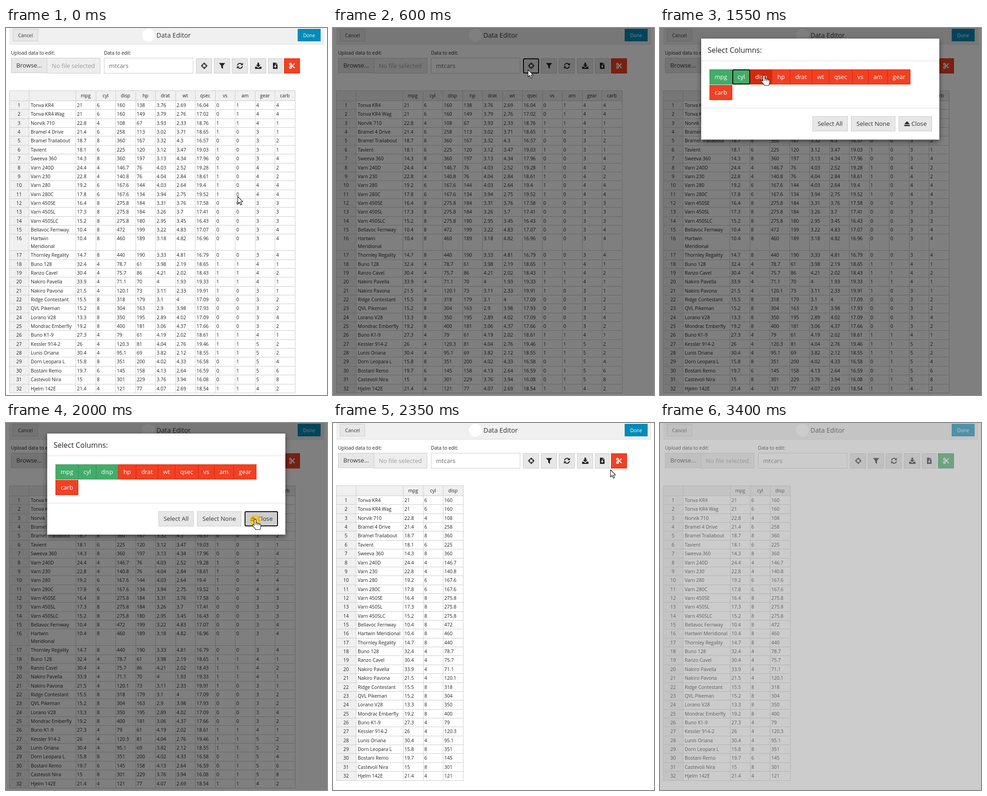
An HTML page that plays this animation: 701x799 px, repeating every 3.45 s.

```html
<!DOCTYPE html>
<html lang="en">
<head>
<meta charset="utf-8">
<title>Data Editor</title>
<style>
html, body { margin: 0; width: 100%; height: 100%; overflow: hidden; background: #fff; }
svg { display: block; font-family: "Open Sans", sans-serif; font-size: 10.4px; fill: #222; }
text { white-space: pre; }
rect { shape-rendering: crispEdges; }
.ring { shape-rendering: auto; fill: none; stroke: #111; stroke-width: 2; }
.mid { text-anchor: middle; }
.big { font-size: 13.2px; }
</style>
</head>
<body>
<svg id="stage" width="701" height="799" viewBox="0 0 701 799">
  <defs>
    <filter id="shadow" x="-10%" y="-10%" width="120%" height="130%">
      <feDropShadow dx="0" dy="4" stdDeviation="6" flood-color="#000" flood-opacity=".5"/>
    </filter>
  </defs>
  <g id="page"></g>
  <rect id="backdrop" width="701" height="799" fill="#000"/>
  <g id="modal"></g>
  <rect id="ended" width="701" height="799" fill="#999" opacity=".5"/>
  <circle id="press" r="12" fill="#ffc40c" opacity=".72"/>
  <g id="cursor" stroke="#111" stroke-width="1.1" fill="#fff" stroke-linejoin="round">
    <path id="arrow" d="M0 0V15.5L3.6 12.2L6.2 18.2L8.8 17L6.3 11.2H11.2Z"/>
    <g id="hand">
      <path d="M-2 .5C-2 -2 2 -2 2 .5V7C3 5.8 5.5 6 5.8 7.8C7 6.8 9 7.2 9.3 8.8C10.6 8.2 12.5 8.8 12.5 10.8V15C12.5 17 11 18.5 11 21H1C0 18 -6 13.5 -6 11.5C-6 9.5 -3.5 9.8 -2 12Z"/>
      <path d="M2 7V11M5.8 8V11.5M9.3 9V12" fill="none"/>
    </g>
  </g>
</svg>
<script>
const LOOP = 3450, STEP = 50;
const $ = id => document.getElementById(id);

function add(parent, tag, attrs, text) {
  const el = document.createElementNS('http://www.w3.org/2000/svg', tag);
  for (const k in attrs) el.setAttribute(k, attrs[k]);
  if (text !== undefined) el.textContent = text;
  return parent.appendChild(el);
}
const box = (p, x, y, w, h, fill) => add(p, 'rect', { x, y, width: w, height: h, fill });
const label = (p, x, y, s, attrs) => add(p, 'text', { x, y, ...attrs }, s);
const framed = (p, x, y, w, h, fill, edge) => {
  box(p, x, y, w, h, edge);
  box(p, x + 1, y + 1, w - 2, h - 2, fill);
};
const show = (el, on) => el.setAttribute('display', on ? 'inline' : 'none');

// fill, hover fill, edge, ink
const LOOK = {
  grey: ['#e7e7e7', '#cecece', '#cbcbcb', '#333'],
  red: ['#f04124', '#d32a0e', '#ea2f10', '#fff'],
  green: ['#43ac6a', '#358753', '#3c9a5f', '#fff'],
  blue: ['#008cba', '#006687', '#0079a1', '#fff']
};

function button(parent, x, y, w, h, look, s, cls = 'mid big', tx = x + w / 2) {
  const g = add(parent, 'g', {});
  const edge = box(g, x, y, w, h, '');
  const face = box(g, x + 1, y + 1, w - 2, h - 2, '');
  if (s) label(g, tx, y + h / 2 + (cls === 'mid' ? 4.2 : 4.9), s, { class: cls, fill: LOOK[look][3] });
  const ring = add(parent, 'rect', { class: 'ring', x: x + 1, y: y + 1, width: w - 2, height: h - 2, rx: 2.5 });
  const b = {
    g,
    has: (px, py) => px >= x && px < x + w && py >= y && py < y + h,
    paint(kind, hover, focus) {
      face.setAttribute('fill', LOOK[kind][hover ? 1 : 0]);
      edge.setAttribute('fill', LOOK[kind][2]);
      show(ring, focus);
    }
  };
  b.paint(look, false, false);
  return b;
}

const ICON = {
  target: '<circle r="4.7" fill="none" stroke="#222" stroke-width="1.8"/><path d="M0-7V-2.2M0 7V2.2M-7 0H-2.2M7 0H2.2" stroke="#222" stroke-width="1.8"/>',
  filter: '<path d="M-6.8-6H6.8L1.9-.2V6.8L-1.9 3.8V-.2Z"/>',
  refresh: '<path d="M-5.4-.8A5.4 5.4 0 0 1 4-3.6M5.4.8A5.4 5.4 0 0 1-4 3.6" fill="none" stroke="#222" stroke-width="2"/><path d="M6.5-6.5V-1.2H1.2ZM-6.5 6.5V1.2H-1.2Z"/>',
  download: '<path d="M-1.8-6.8H1.8V-2H5L0 3L-5-2H-1.8ZM-7 2H-3.4L0 5L3.4 2H7V6.6H-7Z"/>',
  file: '<path d="M-5-6.8H1.2V-2.9H5V6.8H-5ZM2-6.8L5-3.7H2Z"/><path d="M-1-2H1V1H3.2L0 4.4L-3.2 1H-1Z" fill="#e7e7e7"/>',
  cut: '<g fill="none" stroke="#fff" stroke-width="1.8"><circle cx="-3.6" cy="-3.6" r="2"/><circle cx="-3.6" cy="3.6" r="2"/><path d="M-2.2-2.2L5.6 5M-2.2 2.2L5.6-5" stroke-width="2.2"/></g>',
  eject: '<path d="M0-5.5L6 1H-6ZM-6 2.6H6V5H-6Z"/>'
};
const icon = (p, name, x, y) =>
  add(p, 'g', { transform: `translate(${x} ${y})` }).innerHTML = ICON[name];

// name, mpg, disp; the remaining columns follow from these
const cars = `Tonva KR4,21,160|Tonva KR4 Wag,21,160|Norvik 710,22.8,108|Bramel 4 Drive,21.4,258
|Bramel Trailabout,18.7,360|Tavient,18.1,225|Sweeva 360,14.3,360|Varn 240D,24.4,146.7
|Varn 230,22.8,140.8|Varn 280,19.2,167.6|Varn 280C,17.8,167.6|Varn 450SE,16.4,275.8
|Varn 450SL,17.3,275.8|Varn 450SLC,15.2,275.8|Bellavoc Fernway,10.4,472|Hartwin Meridional,10.4,460
|Thornley Regality,14.7,440|Buno 128,32.4,78.7|Ranzo Cavel,30.4,75.7|Nakiro Pavella,33.9,71.1
|Nakiro Pavona,21.5,120.1|Ridge Contestant,15.5,318|QVL Pikeman,15.2,304|Lorano V28,13.3,350
|Mondrac Emberfly,19.2,400|Buno K1-9,27.3,79|Kessler 914-2,26,120.3|Lunis Oriana,30.4,95.1
|Dorn Leopara L,15.8,351|Bostani Remo,19.7,145|Castevoli Nira,15,301|Hjelm 142E,21.4,121`
  .replace(/\n/g, '').split('|').map(specs);

function specs(line, i) {
  const [name, mpg, disp] = line.split(',');
  const within = (a, b) => i >= a && i <= b;
  const noise = (seed, size) => {
    const v = Math.sin(i * 12.9898 + seed * 78.233) * 43758.5453;
    return (v - Math.floor(v) - .5) * size;
  };
  const fix = (v, places) => +v.toFixed(places);
  const cyl = disp > 270 ? 8 : disp > 150 || mpg < 21 ? 6 : 4;
  const am = +(i < 3 || within(17, 19) || i > 24);
  const vs = +(cyl === 4 || (cyl === 6 && !am));
  const gear = within(26, 30) ? 5 : am || within(7, 10) ? 4 : 3;
  const carb = +'44112142244333444121122421224682'[i];
  return {
    name,
    cells: {
      mpg, cyl, disp,
      hp: fix(24 * cyl + 10 * carb - 40 + noise(1, 20), 0),
      drat: fix((gear === 3 ? 3.1 : 4) + noise(2, .5), 2),
      wt: fix(1.65 + .0072 * disp + noise(3, .5), 2),
      qsec: fix(17.2 + 2.2 * vs - .7 * am + noise(4, 1.6), 2),
      vs, am, gear, carb
    }
  };
}
const colNames = Object.keys(cars[0].cells);

function table(count, left, wrap) {
  const g = add($('page'), 'g', {});
  const px = Math.round, colX = c => left + 43.5 * c, top = 137;
  const rowY = i => 159 + 19.36 * i + (wrap && i > 15 ? 16.4 : 0);
  const right = px(colX(count)), bottom = px(rowY(32)), edge = '#ccc';
  box(g, 7, top, right - 7, 22, '#f0f0f0');
  box(g, 7, top, 43, bottom - top, '#f0f0f0');
  for (let c = -2; c <= count; c++)
    box(g, c < 0 ? 7 + 43 * (c + 2) : px(colX(c)), top - 1, 1, bottom - top + 1, edge);
  box(g, 7, top - 1, right - 6, 1, edge);
  for (let r = 0; r <= 32; r++) box(g, 7, px(rowY(r)) - 1, right - 6, 1, edge);
  const shown = colNames.slice(0, count);
  shown.forEach((name, c) => label(g, colX(c) + 22, 151, name, { class: 'mid' }));
  cars.forEach(({ name, cells }, r) => {
    const y = rowY(r) + 13;
    label(g, 28.5, y, r + 1, { class: 'mid' });
    (wrap && r === 15 ? name.split(' ') : [name]).forEach((s, i) => label(g, 54, y + 17 * i, s));
    shown.forEach((col, c) => label(g, colX(c) + 3, y, cells[col]));
  });
  return g;
}

// page
const page = $('page');
box(page, 0, 0, 701, 799, '#fff');
box(page, 7, 0, 688, 36, '#f0f0f0');
box(page, 7, 35, 688, 1, '#ddd');
button(page, 15, 2, 55, 27, 'grey', 'Cancel', 'mid');
const done = button(page, 637, 2, 50, 27, 'blue', 'Done', 'mid');
add(page, 'circle', { cx: 311, cy: 16, r: 14, fill: '#fff' });
label(page, 328.5, 20.5, 'Data Editor', { 'font-size': 14.3, fill: '#333' });
label(page, 11, 58, 'Upload data to edit:');
label(page, 214, 58, 'Data to edit:');
framed(page, 89, 65, 117, 34, '#eee', '#ccc');
label(page, 100, 87, 'No file selected', { class: 'big', fill: '#999' });
button(page, 11, 65, 79, 33, 'grey', 'Browse...');
framed(page, 214, 65, 195, 34, '#fff', '#ccc');
label(page, 225, 87, 'mtcars', { class: 'big', fill: '#666' });
let toolX = 415;
const tools = ['target', 'filter', 'refresh', 'download', 'file', 'cut'].map(name => {
  const w = name === 'file' ? 32 : 35.8, x = Math.round(toolX);
  const b = button(page, x, 66, Math.floor(w), 33, name === 'cut' ? 'red' : 'grey');
  icon(b.g, name, x + w / 2, 82.3);
  toolX += w + 3.4;
  return b;
});
const fullTable = table(11, 152, true), cutTable = table(3, 153, false);

// dialog
const modal = $('modal');
add(modal, 'rect', { x: 90, y: 23, width: 520, height: 220, fill: '#fff', filter: 'url(#shadow)' });
box(modal, 90, 71, 520, 1, '#ddd');
box(modal, 90, 174, 520, 1, '#ddd');
label(modal, 104, 54, 'Select Columns:', { 'font-size': 16 });

function textWidth(s) {
  const el = label(modal, 0, 0, s, { class: 'big' }), w = el.getComputedTextLength();
  el.remove();
  return w;
}
let pickX = 108, pickY = 90;
const picks = colNames.map(name => {
  const w = textWidth(name) + 22.5;
  if (pickX + w > 590) [pickX, pickY] = [108, pickY + 34];
  const x = Math.round(pickX);
  pickX += w;
  return button(modal, x, pickY, Math.round(pickX) - x, 33, 'red', name);
});
button(modal, 333, 192, 77, 33, 'grey', 'Select All');
button(modal, 417, 192, 97, 33, 'grey', 'Select None');
const closer = button(modal, 521, 192, 73, 33, 'grey', 'Close', 'big', 549);
icon(closer.g, 'eject', 539.5, 208.5);

// pointer stops: arrive, leave, x, y
const stops = [[0, 0, 506, 367], [350, 650, 426, 91], [1000, 1150, 142, 101], [1300, 1400, 178, 105],
  [1550, 1700, 227, 104], [1950, 2200, 544, 211], [2350, 2350, 606, 102], [2450, 2650, 624, 82],
  [2850, 3300, 664, 18], [3350, LOOP, 676, 39]];
const presses = [400, 1100, 1350, 1600, 2000, 2500, 2950];
const chosen = [1150, 1400, 1650];

const ramp = (t, from, span) => Math.max(0, Math.min(1, (t - from) / span));
const easeOut = v => 1 - (1 - v) ** 1.8;

function pointerAt(t) {
  const i = stops.findIndex(s => t <= s[1]);
  const [arrive, , x, y] = stops[i];
  if (t >= arrive) return [x, y];
  const [, leave, x0, y0] = stops[i - 1];
  const u = ramp(t, leave, arrive - leave), s = u * u * (3 - 2 * u);
  return [x0 + (x - x0) * s, y0 + (y - y0) * s];
}

function draw(t) {
  const [x, y] = pointerAt(t);
  const dim = ramp(t, 450, 150) - ramp(t, 2200, 150);
  const fade = ramp(t, 620, 150) - ramp(t, 2090, 145);
  const lift = t < 1500 ? 1 - easeOut(ramp(t, 620, 300)) : easeOut(ramp(t, 2085, 250));
  const ended = t >= 3150;
  const onPage = dim === 0 && !ended, onModal = t >= 700 && t < 2100;
  let hot = false;
  const over = (b, live) => {
    const hit = live && b.has(x, y);
    hot = hot || hit;
    return hit;
  };

  done.paint('blue', over(done, onPage), false);
  tools.forEach((b, i) => {
    const cut = i === 5;
    b.paint(cut ? (t >= 2550 ? 'green' : 'red') : 'grey', over(b, onPage),
      (i === 0 && t >= 400 && t < 700) || (cut && t >= 2500 && t < 2950));
  });
  picks.forEach((b, i) => b.paint(t >= chosen[i] ? 'green' : 'red', over(b, onModal),
    t >= chosen[i] && t < (chosen[i + 1] || 2000)));
  closer.paint('grey', over(closer, onModal), t >= 2000);

  show(fullTable, t < 2150);
  show(cutTable, t >= 2150);
  $('backdrop').setAttribute('opacity', .5 * dim);
  modal.setAttribute('opacity', fade);
  modal.setAttribute('transform', `translate(0 ${Math.round(-40 * lift)})`);
  show(modal, fade > 0);
  show($('ended'), ended);

  const press = $('press');
  press.setAttribute('cx', x);
  press.setAttribute('cy', y + 1);
  show(press, presses.some(p => t >= p && t < p + STEP));
  $('cursor').setAttribute('transform', `translate(${x} ${y})`);
  show($('cursor'), t < 3400);
  show($('arrow'), !hot);
  show($('hand'), hot);
}

const tick = now => {
  draw(Math.floor(now % LOOP / STEP) * STEP);
  requestAnimationFrame(tick);
};
draw(0);
requestAnimationFrame(tick);
</script>
</body>
</html>
```
